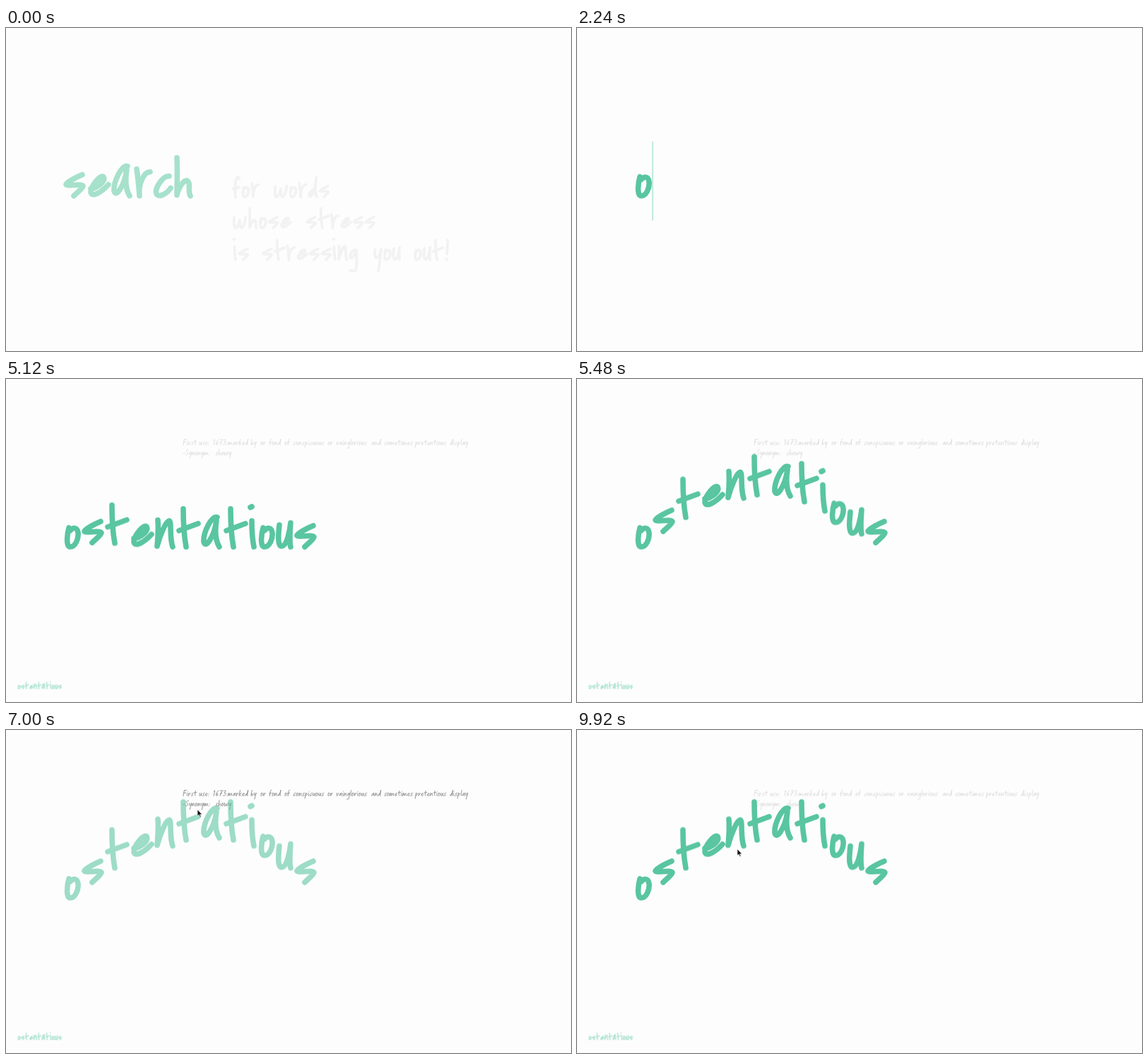
These frames come from a looping animation (800x458 px, 10 s). An HTML page:

```html
<!DOCTYPE html>
<html lang="en">
<head>
<meta charset="utf-8">
<title>Search for a word</title>
<style>
  html, body { margin: 0; width: 100%; height: 100%; overflow: hidden; background: #fdfdfd; }
  svg { display: block; width: 100vw; height: 100vh; }
  path { fill: none; stroke-linecap: round; stroke-linejoin: round; }

  #search, #footer { stroke: #a6e1cc; }
  #hint { stroke: #f2f2f2; }
  #word { stroke: #59c5a1; }
  #definition { stroke: #3a3a3a; }
  #caret { fill: #b4e6d5; }
  .pointer path { fill: #111; stroke: #fff; stroke-width: .6; }

  #hint { animation: hint 10s infinite; }
  #search { animation: search 10s step-end infinite; }
  #typed { animation: typed 10s step-end infinite; }
  #word { animation: dim 10s infinite; }
  #word path {
    animation: type 10s step-end calc(var(--typed) * 1ms) infinite both,
               rise 10s calc(var(--i) * 36ms) infinite both;
  }
  #result { animation: result 10s infinite; }
  #definition { animation: read 10s infinite; }
  #enter { animation: enter 10s infinite; }
  #hover { animation: hover 10s infinite; }

  @keyframes hint { 0%, 13.6% { opacity: 1 } 17.6%, 100% { opacity: 0 } }
  @keyframes search { 0% { opacity: 1 } 22.4%, 100% { opacity: 0 } }
  @keyframes typed { 0% { opacity: 0 } 22.4%, 100% { opacity: 1 } }
  @keyframes type { 0% { opacity: 0 } 22.4%, 100% { opacity: 1 } }
  @keyframes rise {
    0%, 49.9% { translate: 0 0; animation-timing-function: ease }
    54.9%, 100% { translate: 0 var(--lift) }
  }
  @keyframes result { 0%, 48% { opacity: 0 } 50.5%, 100% { opacity: 1 } }
  @keyframes dim {
    0%, 68.4% { opacity: 1 }
    73.4%, 87.6% { opacity: .25 }
    92.8%, 100% { opacity: 1 }
  }
  @keyframes read {
    0%, 68.4% { opacity: .18 }
    73.4%, 87.6% { opacity: 1 }
    92.8%, 100% { opacity: .18 }
  }
  @keyframes enter {
    0% { opacity: 0; translate: 54px -2px; animation-timing-function: step-end }
    4.8% { opacity: 1; translate: 54px -2px; animation-timing-function: ease-in-out }
    10.4% { opacity: 1; translate: 139px 217px; animation-timing-function: step-end }
    22.4%, 100% { opacity: 0; translate: 139px 217px }
  }
  @keyframes hover {
    0% { opacity: 0; translate: 215px 190px; animation-timing-function: step-end }
    59% { opacity: 1; translate: 215px 190px }
    70% { opacity: 1; translate: 271px 113px }
    75.2%, 77.2% { opacity: 1; translate: 281px 104px }
    83.2% { opacity: 1; translate: 249px 140px }
    86.8%, 95.2% { opacity: 1; translate: 239px 151px }
    99.2%, 100% { opacity: 1; translate: 227px 169px }
  }
</style>
</head>
<body>
<svg id="stage" viewBox="0 0 800 458" preserveAspectRatio="none">
  <g id="hint"></g>
  <g id="search"></g>
  <g id="result"><g id="definition"></g><g id="footer"></g></g>
  <g id="typed"><g id="word"></g></g>
  <rect id="caret" y="161" width="1.7" height="112"/>
  <g id="enter" class="pointer"><path d="M0 0V9L2.2 7.2 3.7 10.5 5.2 9.9 3.7 6.8H6.6Z"/></g>
  <g id="hover" class="pointer"><path d="M0 0V9L2.2 7.2 3.7 10.5 5.2 9.9 3.7 6.8H6.6Z"/></g>
</svg>
<script>
  const LOOP = 10000;

  // Pen strokes by character: [advance, path], baseline at y = 0.
  const marker = {
    o: [25, 'M7 -31C5 -24 2 -4 9 -4C16 -4 21 -15 20 -24C19 -32 13 -32 9 -27'],
    s: [33, 'M27 -34C20 -31 6 -24 4 -20C6 -17 24 -22 28 -18C27 -14 20 -9 15 -4'],
    t: [35, 'M10 -58C10 -40 11 -20 14 -4M4 -27L31 -37'],
    e: [35, 'M6 -14C14 -15 28 -24 24 -31C20 -35 6 -18 6 -9C8 -1 22 -10 31 -20'],
    n: [31, 'M5 -42C6 -30 5 -16 4 -5C8 -20 17 -42 21 -41C25 -40 21 -18 26 -4'],
    a: [32, 'M23 -46C15 -49 3 -24 4 -11C6 -1 18 -16 22 -41C20 -28 20 -14 26 -4'],
    i: [14, 'M5 -41C5 -28 6 -14 8 -4M3 -60L5 -61'],
    u: [26, 'M5 -35C3 -16 3 -4 9 -5C16 -6 20 -28 21 -38C20 -24 19 -12 21 -4'],
    r: [27, 'M4 -42C6 -30 7 -16 8 -4C6 -20 14 -38 23 -38'],
    c: [29, 'M23 -32C14 -33 2 -14 5 -7C8 -1 19 -6 25 -15'],
    h: [30, 'M5 -58C6 -38 5 -18 5 -5C8 -18 16 -28 20 -25C25 -22 20 -10 24 -4'],
    f: [26, 'M21 -54C14 -66 9 -52 9 -30L9 -2M2 -26L20 -31'],
    w: [42, 'M4 -33C3 -10 5 -2 9 -4C14 -6 18 -18 20 -26C19 -10 22 -2 26 -5C32 -9 35 -25 36 -34'],
    d: [30, 'M22 -24C14 -28 3 -14 5 -7C8 0 20 -12 24 -58C22 -38 21 -16 25 -4'],
    g: [27, 'M21 -30C12 -34 3 -20 5 -10C8 -4 19 -18 22 -30C22 -10 25 22 18 27C13 28 8 26 4 26'],
    y: [27, 'M5 -32C3 -18 5 -8 10 -9C16 -11 20 -24 22 -33C20 -14 18 10 14 27'],
    '!': [12, 'M9 -58L7 -20M6 -5L6.5 -4'],
  };

  // The finer hand keeps an even x-height and adds a few characters.
  const pen = {
    ...marker,
    a: [30, 'M21 -29C13 -34 3 -17 5 -8C9 -1 19 -16 22 -29C19 -16 20 -6 26 -4'],
    n: [30, 'M6 -31L4 -4C8 -18 16 -31 20 -28C23 -24 18 -8 24 -4'],
    u: [28, 'M6 -30C3 -14 4 -4 9 -4C16 -6 20 -20 22 -30C20 -18 19 -8 24 -4'],
    r: [26, 'M6 -31L6 -4C7 -18 13 -30 21 -28'],
    s: [27, 'M22 -31C14 -30 6 -24 8 -20C11 -16 21 -17 20 -10C18 -4 9 -3 4 -6'],
    i: [15, 'M6 -30C5 -20 5 -10 9 -4M7 -45L8 -45'],
    t: [28, 'M12 -50C11 -34 9 -4 18 -5M3 -33L24 -36'],
    e: [28, 'M6 -17C14 -16 22 -23 19 -29C14 -33 3 -18 5 -9C8 -1 18 -5 24 -11'],
    m: [46, 'M6 -31L4 -4C9 -22 16 -32 19 -27L19 -5C25 -22 32 -32 35 -27C36 -20 33 -8 39 -4'],
    k: [30, 'M8 -56L5 -4M23 -30L7 -17L24 -4'],
    b: [28, 'M8 -56L5 -6C12 0 24 -10 21 -21C18 -27 10 -20 6 -13'],
    p: [28, 'M8 -31L4 20M7 -22C13 -34 24 -28 21 -17C18 -7 10 -4 6 -7'],
    v: [27, 'M5 -30C7 -20 8 -10 10 -4C16 -14 20 -24 23 -31'],
    l: [14, 'M8 -56C6 -36 4 -8 10 -4'],
    F: [34, 'M9 -54L6 -3M9 -54L31 -57M8 -31L26 -33'],
    S: [34, 'M28 -52C18 -62 4 -45 10 -36C16 -30 28 -26 22 -13C17 -4 7 -2 4 -10'],
    1: [27, 'M8 -44L18 -54L14 -4'],
    6: [34, 'M25 -54C12 -44 5 -22 8 -10C12 0 27 -8 25 -20C22 -28 12 -21 9 -14'],
    7: [33, 'M6 -51L29 -54C21 -38 14 -20 12 -4M9 -27L25 -29'],
    3: [33, 'M8 -51C19 -59 31 -50 24 -40L14 -32C28 -34 30 -18 22 -9C16 -3 8 -4 5 -9'],
    ':': [16, 'M7 -25L7.5 -25M6 -6L6.5 -6'],
    '-': [23, 'M4 -19L18 -21'],
  };

  const byId = id => document.getElementById(id);

  function add(parent, tag, attrs) {
    const node = document.createElementNS('http://www.w3.org/2000/svg', tag);
    for (const key in attrs) node.setAttribute(key, attrs[key]);
    return parent.appendChild(node);
  }

  function write(id, text, x, y, { glyphs = marker, scale = 1, weight = 7.6, slant = 0 } = {}) {
    const group = add(byId(id), 'g', {
      transform: `translate(${x} ${y}) scale(${scale}) skewX(${slant})`,
      'stroke-width': weight, role: 'img', 'aria-label': text,
    });
    let at = 0;
    return [...text].map(char => {
      const [advance, d] = glyphs[char];
      const path = add(group, 'path', { d, transform: `translate(${at} 0)` });
      at += advance;
      return { path, end: x + at * scale };
    });
  }

  function writeLine(id, words, starts, y, style) {
    words.split(' ').forEach((word, i) => write(id, word, starts[i], y, style));
  }

  const faint = { scale: .51, weight: 7.4 };
  const fine = { glyphs: pen, scale: .152, weight: 5.4, slant: -7 };

  write('search', 'search', 81, 242);
  writeLine('hint', 'for words', [320, 379], 241.5, faint);
  writeLine('hint', 'whose stress', [321, 424], 285.5, faint);
  writeLine('hint', 'is stressing you out!', [321, 362, 520, 577], 330.5, faint);
  writeLine('definition',
    'First use: 1673:marked by or fond of conspicuous or vainglorious and sometimes pretentious display',
    [250, 273, 292, 346, 360, 372, 394, 406, 455, 467, 517, 535, 579, 628], 94, fine);
  writeLine('definition', '-Synonym: showy', [250, 296], 108.5, fine);
  write('footer', 'ostentatious', 16.5, 440, { scale: .175 });

  const keyTimes = [2240, 2360, 2520, 2640, 2760, 2880, 3080, 3200, 3360, 3500, 3640, 3800];
  const letters = write('word', 'ostentatious', 82, 242);
  letters.forEach(({ path }, i) => {
    path.style.setProperty('--i', i);
    path.style.setProperty('--typed', keyTimes[i] - keyTimes[0]);
    path.style.setProperty('--lift', `${-85 * Math.sin(Math.PI * i / letters.length)}px`);
  });

  const caretAt = (time, x, opacity) =>
    ({ offset: time / LOOP, translate: `${x - .8}px 0`, opacity, easing: 'step-end' });
  const lastX = letters.at(-1).end;
  byId('caret').animate([
    caretAt(0, 81, 0),
    caretAt(1360, 81, 1),
    caretAt(1840, 81, 0),
    ...letters.map(({ end }, i) => caretAt(keyTimes[i], end, 1)),
    caretAt(4280, lastX, 0),
    caretAt(LOOP, lastX, 0),
  ], { duration: LOOP, iterations: Infinity });
</script>
</body>
</html>
```
